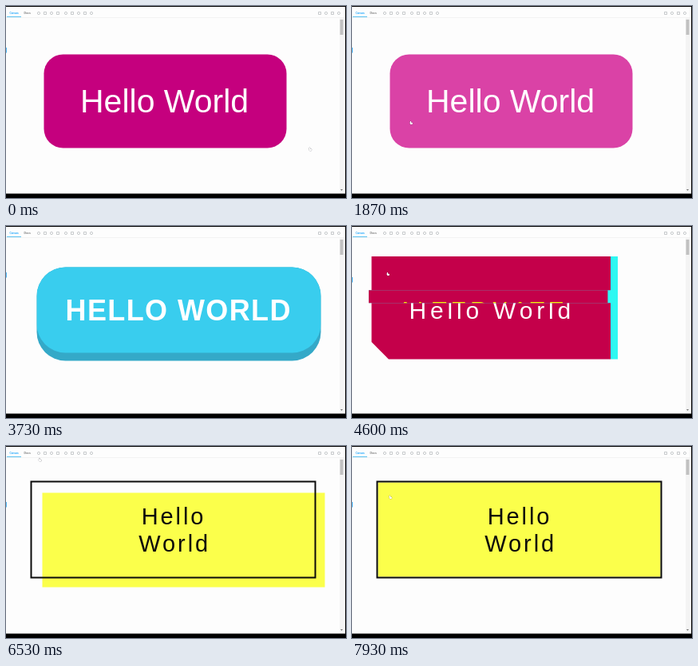
Recreate the animation shown at these times as an HTML page with a canvas. Size 426x240 px, loop 8 s.

```html
<!DOCTYPE html>
<html lang="en">
<head>
<meta charset="utf-8">
<title>Button hover effects</title>
<style>
  html, body { margin: 0; width: 100%; height: 100%; overflow: hidden; background: #fdfdfd; }
  canvas { display: block; width: 426px; height: 240px; }
</style>
</head>
<body>
<canvas></canvas>
<script>
const W = 426, H = 240, LOOP = 8000, FPS = 15;
const SANS = '"Liberation Sans", Arial, sans-serif';
const canvas = document.querySelector('canvas');
const ctx = canvas.getContext('2d');
const dpr = window.devicePixelRatio || 1;
canvas.width = W * dpr;
canvas.height = H * dpr;

const clamp = v => Math.max(0, Math.min(1, v));
const lerp = (a, b, k) => a + (b - a) * k;
const ease = k => k * k * (3 - 2 * k);
const progress = (t, start, length) => ease(clamp((t - start) / length));

function rect(x, y, w, h, color) {
  ctx.fillStyle = color;
  ctx.fillRect(x, y, w, h);
}

function roundRect(x, y, w, h, r, color) {
  ctx.beginPath();
  ctx.roundRect(x, y, w, h, r);
  ctx.fillStyle = color;
  ctx.fill();
}

function poly(points, color) {
  ctx.beginPath();
  points.forEach(([x, y]) => ctx.lineTo(x, y));
  ctx.closePath();
  ctx.fillStyle = color;
  ctx.fill();
}

function text(str, x, y, size, color, spacing = 0, weight = 400) {
  ctx.font = `${weight} ${size}px ${SANS}`;
  ctx.letterSpacing = spacing + 'px';
  ctx.fillStyle = color;
  ctx.fillText(str, x, y);
}

// Scenes

function drawPink(t) {
  const k = progress(t, 600, 300);
  const mix = [[197, 218], [0, 66], [126, 166]].map(([a, b]) => Math.round(lerp(a, b, k)));
  roundRect(47.5, 60.5, 304, 117, 24, `rgb(${mix})`);
  text('Hello World', 93, 133, 41, '#fff');
}

function drawCyan() {
  const box = [38.5, 51.5, 356, 117, 36];
  roundRect(...box, '#34a9c8');
  ctx.save();
  ctx.beginPath();
  ctx.roundRect(...box);
  ctx.clip();
  roundRect(38.5, 41.5, 356, 117, 36, '#39cdee');
  ctx.restore();
  text('HELLO WORLD', 74.5, 118, 36, '#fff', 1.4, 700);
}

const BOX = { x: 24.5, y: 38, w: 299.5, h: 128.5 };
const RED = '#c4004a', AQUA = '#2ef8f2', SCALE = 1.49;

// Top and bottom insets of the visible slice, in percent
const SLICES = { 1: [80, 0], 2: [50, 30], 3: [10, 85], 4: [40, 43], 5: [80, 5] };
// Slice, x shift, y shift; one key per 100 ms
const GLITCH = [
  [1, -20, -10], [3, 10, 10], [1, -10, 10], [3, 0, 5], [2, -5, 0], [3, 5, 0],
  [4, 5, 10], [2, -10, 10], [5, 20, -10], [1, -10, 0], [1, 0, 0]
];

function cutBox(leg, color) {
  const { x, y, w, h } = BOX;
  poly([[x, y], [x + w, y], [x + w, y + h], [x + leg, y + h], [x, y + h - leg]], color);
}

function drawGlitchLayer(ms) {
  const i = Math.floor(ms / 100);
  const k = ms % 100 < 50 ? 0 : 0.5;
  const [sa, xa, ya] = GLITCH[i], [sb, xb, yb] = GLITCH[i + 1];
  const top = lerp(SLICES[sa][0], SLICES[sb][0], k) / 100;
  const bottom = lerp(SLICES[sa][1], SLICES[sb][1], k) / 100;
  const { x, y, w, h } = BOX;
  ctx.save();
  ctx.translate(lerp(xa, xb, k) * SCALE, lerp(ya, yb, k) * SCALE);
  ctx.beginPath();
  ctx.rect(x, y + h * top, w + 9, h * (1 - top - bottom));
  ctx.clip();
  rect(x + w, y, 9, h, AQUA);
  cutBox(12.8, AQUA);
  cutBox(21.4, RED);
  const d = 3 * SCALE, tx = 65, ty = 115.5;
  text('ALTERNATE', tx + d, ty + d, 30, AQUA, 4.6);
  text('ALTERNATE', tx - d, ty - d, 30, '#f8f005', 4.6);
  text('ALTERNATE', tx, ty, 30, '#fff', 4.6);
  ctx.restore();
}

function drawGlitch(t) {
  rect(BOX.x + BOX.w, BOX.y, 9, BOX.h, AQUA);
  cutBox(21.4, RED);
  text('Hello World', 71.6, 115.5, 30, '#fff', 4.8);
  const ms = t - 4220;
  if (ms >= 0 && ms < 1000) drawGlitchLayer(ms);
}

function drawYellow(t) {
  const shift = 13 * (1 - progress(t, 6900, 200));
  rect(32.5 + shift, 45.5 + shift, 354, 118, '#fbff4b');
  ctx.strokeStyle = '#0b0b0b';
  ctx.lineWidth = 2;
  ctx.strokeRect(31.5, 44.5, 356, 120);
  text('Hello', 169.7, 98, 29, '#0b0b0b', 2.9);
  text('World', 166.3, 132, 29, '#0b0b0b', 2.9);
}

const SCENES = [
  { until: 2400, draw: drawPink },
  { until: 3950, draw: drawCyan },
  { until: 6100, draw: drawGlitch },
  { until: LOOP, draw: drawYellow }
];

// Window frame

function drawIcon(x, kind) {
  ctx.beginPath();
  if (kind % 2) ctx.rect(x - 1.5, 7.5, 3, 3);
  else ctx.arc(x, 9, 1.6, 0, 7);
  ctx.stroke();
}

function drawFrame(scene) {
  rect(0, 0, W, H, '#000');
  rect(0, 1, 425, 233.5, '#fdfdfd');
  rect(0, 14, 425, 0.5, '#e8e8e8');
  text('Canvas', 4.5, 10.3, 3.2, '#1ea7fd', 0, 700);
  text('Docs', 22.5, 10.3, 3.4, '#777', 0, 700);
  rect(1, 13, 18, 1, '#59c2f2');
  ctx.strokeStyle = '#a5a9ae';
  ctx.lineWidth = 0.6;
  [41, 49, 57, 65, 75, 83, 91, 99, 107].forEach(drawIcon);
  [393, 401, 409, 417].forEach((x, i) => drawIcon(x, i + 1));
  rect(418, 15, 5, 219, '#f4f4f4');
  rect(418.5, 17, 4, 19, '#c1c1c1');
  poly([[419, 229], [422, 229], [420.5, 231]], '#777');
  rect(0, 52 + scene * 6, 1, 6.5, '#4db5f5');
}

// Pointer: time, x, y
const PATH = [
  [0, 381, 179], [250, 381, 179], [900, 74, 146], [2000, 74, 146], [2350, -8, 60],
  [4080, -8, 66], [4330, 45, 60], [5800, 45, 60], [6050, -8, 72], [6250, -8, 60],
  [6530, 50, 11], [6700, 50, 11], [7050, 48, 64], [LOOP, 48, 64]
];

function drawPointer(t) {
  const i = PATH.findIndex(p => p[0] > t) - 1;
  const [ta, xa, ya] = PATH[i], [tb, xb, yb] = PATH[i + 1];
  const k = progress(t, ta, tb - ta);
  ctx.save();
  ctx.translate(lerp(xa, xb, k), lerp(ya, yb, k));
  ctx.beginPath();
  [[-1, -2], [0, -2], [0, -0.5], [2, 0], [1.5, 2], [-0.5, 2], [-1.5, 0.5]].forEach(p => ctx.lineTo(...p));
  ctx.closePath();
  ctx.fillStyle = '#fff';
  ctx.strokeStyle = 'rgba(60, 60, 70, 0.6)';
  ctx.lineWidth = 0.6;
  ctx.stroke();
  ctx.fill();
  ctx.restore();
}

function render(t) {
  ctx.setTransform(dpr, 0, 0, dpr, 0, 0);
  const scene = SCENES.findIndex(s => t < s.until);
  drawFrame(scene);
  SCENES[scene].draw(t);
  drawPointer(t);
}

const start = performance.now();
function tick() {
  const elapsed = (performance.now() - start) % LOOP;
  render(Math.floor(elapsed * FPS / 1000 + 0.01) * 1000 / FPS % LOOP);
  requestAnimationFrame(tick);
}
tick();
</script>
</body>
</html>
```
